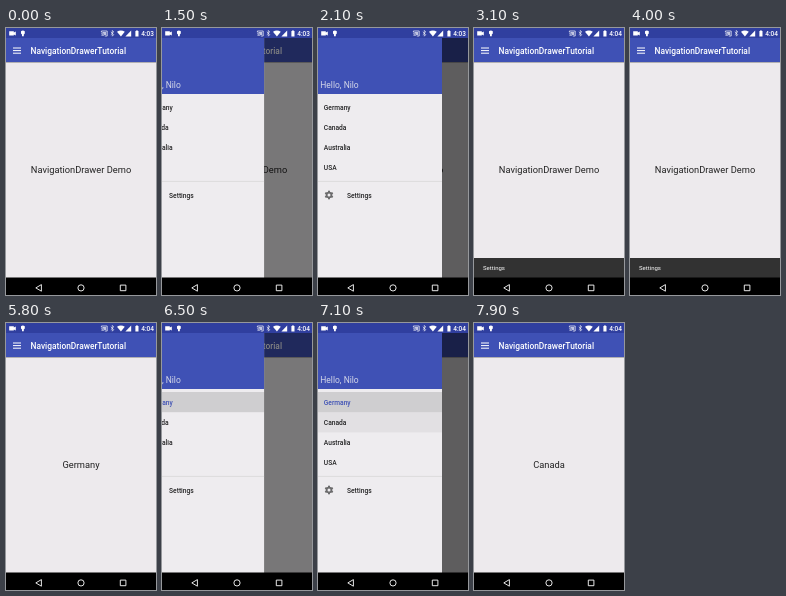
Recreate the animation shown at these times as an HTML page. Size 150 by 267 pixels, loop 8000 ms.

```html
<!DOCTYPE html>
<html lang="en">
<head>
<meta charset="utf-8">
<title>Navigation drawer</title>
<style>
html, body { margin: 0; width: 100%; height: 100%; overflow: hidden; background: #000; }
svg { display: block; width: 100vw; height: 100vh; font-family: Roboto, sans-serif; }
.item { font-size: 6.67px; font-weight: 500; fill: #242425; }
</style>
</head>
<body>
<svg viewBox="0 0 150 267" preserveAspectRatio="none">
  <rect width="150" height="267" fill="#edeaed"/>
  <text id="label" x="75" y="145.4" font-size="9.3" text-anchor="middle" fill="#222"></text>

  <rect y="34" width="150" height="1" fill="#000" opacity=".25"/>
  <rect y="10" width="150" height="24" fill="#3f51b5"/>
  <path id="burger" d="M7 20h8M7 22.6h8M7 25.2h8" stroke="#fff" stroke-width="1"/>
  <text x="24.5" y="26" font-size="8.4" font-weight="500" fill="#fff">NavigationDrawerTutorial</text>

  <g id="snack">
    <rect y="230" width="150" height="20.5" fill="#323232"/>
    <text id="snackText" x="9" y="242.3" font-size="6" fill="#fff">Settings</text>
  </g>

  <rect id="scrim" y="10" width="150" height="240"/>

  <g id="drawer">
    <rect y="10" width="124" height="240" fill="#eeecef"/>
    <rect y="10" width="124" height="56" fill="#3f51b5"/>
    <text x="2.3" y="59.7" font-size="8.5" fill="#d3d6e8">Hello, Nilo</text>
    <g id="items"></g>
    <path d="M0 153.4h124" stroke="#d0cfd1" stroke-width=".6"/>
    <g transform="translate(11 167)">
      <g id="gear" fill="#6c6c6d"></g>
      <circle r="2.4" fill="none" stroke="#6c6c6d" stroke-width="1.8"/>
    </g>
  </g>

  <rect width="150" height="10" fill="#303f9f"/>
  <g fill="#fff">
    <path d="M3.2 3.2h4.6v1.2l2-1v4l-2-1v1.2H3.2z"/>
    <path d="M15 3.2q1.9-1.3 3.8 0v2.2l-1 1.2v1.6h-1.8V6.6l-1-1.2z"/>
    <path d="M96.4 4h3.8v3h-2q-.4-1.6-1.8-2z" opacity=".7"/>
    <path d="M95.4 4.4V3h5.8v5h-2.4M95.4 5.4q2 .4 2.4 2.4M95.4 7h.9v.8" fill="none" stroke="#fff" stroke-width=".7"/>
    <path d="M104.8 3.8l3 2.9-1.5 1.5V2.4l1.5 1.5-3 2.9" fill="none" stroke="#fff" stroke-width=".6"/>
    <path d="M111 3.8q3.9-2.8 7.8 0l-3.9 4.8z"/>
    <path d="M125.2 2.6v5.8h-5.8z"/>
    <path d="M129.4 3h.9v-.7h1.3V3h.9v5.4h-3.1z"/>
    <text id="clock" x="148" y="8" font-size="6.5" font-weight="500" text-anchor="end"></text>
  </g>

  <rect y="249.5" width="150" height="17.5"/>
  <g fill="none" stroke="#fff" stroke-width=".9" stroke-linejoin="round">
    <path d="M35.4 256.6v6.6l-5.6-3.3z"/>
    <circle cx="75" cy="259.9" r="3.1"/>
    <rect x="114.3" y="257.1" width="5.6" height="5.6"/>
  </g>
</svg>
<script>
const LOOP = 8000, STEP = 100, SETTLE = 512, WIDTH = 124;
const names = ["Germany", "Canada", "Australia", "USA", "Settings"];
const visits = [
  { open: 1350, press: 2250, close: 2500, pick: 4 },
  { open: 4000, press: 4750, close: 5000, pick: 0 },
  { open: 6350, press: 7050, close: 7280, pick: 1 }
];
const snackIn = 2700, snackOut = 4350, snackTime = 250;

const $ = id => document.getElementById(id);
const clamp = v => Math.min(1, Math.max(0, v));
const easeOut = v => 1 - (1 - clamp(v)) ** 5;
const smooth = v => { v = clamp(v); return v * v * (3 - 2 * v); };

function add(parent, tag, attrs) {
  const el = document.createElementNS("http://www.w3.org/2000/svg", tag);
  for (const key in attrs) el.setAttribute(key, attrs[key]);
  return parent.appendChild(el);
}

const rows = names.map((name, i) => {
  const last = i === 4;
  const y = last ? 157 : 69 + i * 20.2;
  const back = add($("items"), "rect", { y, width: WIDTH, height: 20.2 });
  const text = add($("items"), "text", { class: "item", x: last ? 29 : 5.8, y: y + 12.5 });
  text.textContent = name;
  return { back, text };
});

for (let a = 0; a < 360; a += 60)
  add($("gear"), "rect", { x: -1, y: -4.3, width: 2, height: 2, transform: `rotate(${a})` });

function openness(t) {
  const v = visits.findLast(v => t >= v.open);
  if (!v) return 0;
  return t < v.close ? easeOut((t - v.open) / SETTLE) : 1 - easeOut((t - v.close) / SETTLE);
}

function draw(t) {
  const p = openness(t);
  const pressed = visits.find(v => t >= v.press && t < v.close);
  const chosen = visits.findLast(v => t >= v.close && v.pick < 4);

  $("drawer").setAttribute("transform", `translate(${(p - 1) * WIDTH} 0)`);
  $("drawer").setAttribute("visibility", p > 0.002 ? "visible" : "hidden");
  $("scrim").setAttribute("opacity", 0.6 * p);
  $("burger").setAttribute("transform", `rotate(${180 * p} 11 22.6)`);

  rows.forEach(({ back, text }, i) => {
    const on = chosen && chosen.pick === i;
    const down = pressed && pressed.pick === i;
    back.setAttribute("fill-opacity", on ? 0.13 : down ? 0.05 : 0);
    text.style.fill = on ? "#3f51b5" : "";
  });

  $("label").textContent = chosen ? names[chosen.pick] : "NavigationDrawer Demo";
  $("clock").textContent = t < 2800 ? "4:03" : "4:04";

  const up = smooth((t - snackIn) / snackTime) - smooth((t - snackOut) / snackTime);
  $("snack").setAttribute("transform", `translate(0 ${(1 - up) * 20.5})`);
  $("snack").setAttribute("visibility", up > 0 ? "visible" : "hidden");
  $("snackText").setAttribute("opacity", up);
}

const start = performance.now();
function tick() {
  const t = (performance.now() - start) % LOOP;
  draw(Math.floor(t / STEP) * STEP);
  requestAnimationFrame(tick);
}
tick();
</script>
</body>
</html>
```
